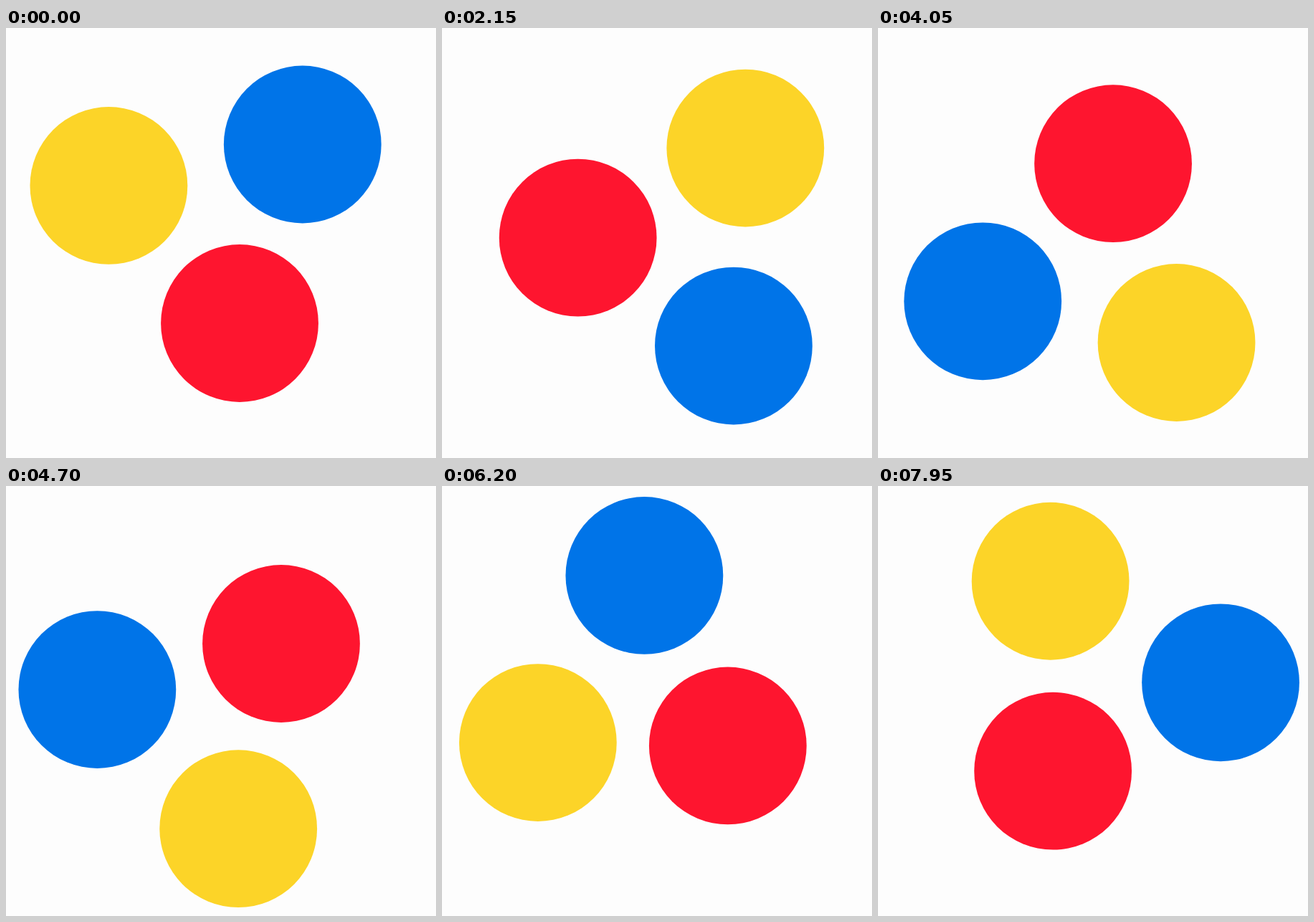
Write an HTML page that moves like this. It is 600 by 600 pixels and loops after 8 s.

```html
<!DOCTYPE html>
<html lang="en">
<head>
<meta charset="utf-8">
<title>Orbiting circles</title>
<style>
  html, body { margin: 0; height: 100%; overflow: hidden; background: #fdfdfd; }
  svg { display: block; width: 100%; height: 100%; }
</style>
</head>
<body>
<svg viewBox="0 0 600 600">
  <circle id="yellow" r="109.9" fill="#fcd428"/>
  <circle id="blue" r="109.9" fill="#0074e8"/>
  <circle id="red" r="109.9" fill="#fe152f"/>
</svg>
<script>
const LOOP = 8000, STEP = 50;
const CENTER = { x: 303.3, y: 300.4 };

// Orbit radius and starting angle in degrees, clockwise from the right.
const discs = [
  { id: 'yellow', orbit: 179, start: 206.7 },
  { id: 'blue', orbit: 176.7, start: -51.3 },
  { id: 'red', orbit: 113.9, start: 78.5 },
].map(disc => ({ ...disc, node: document.getElementById(disc.id) }));

// Shared turn: [ms, degrees]; the speed drifts slightly along the way.
const turns = [
  [0, 0], [850, 39.4], [1150, 54.9], [2150, 105.4], [3400, 171.5],
  [4700, 236.6], [6200, 314.5], [7950, 402.8], [8000, 405.3],
];

function turnAt(time) {
  const next = turns.findIndex(([ms]) => ms > time);
  const [t0, a0] = turns[next - 1];
  const [t1, a1] = turns[next];
  return a0 + (a1 - a0) * (time - t0) / (t1 - t0);
}

function draw(time) {
  const turn = turnAt(time);
  for (const { node, orbit, start } of discs) {
    const angle = (start + turn) * Math.PI / 180;
    node.setAttribute('cx', CENTER.x + orbit * Math.cos(angle));
    node.setAttribute('cy', CENTER.y + orbit * Math.sin(angle));
  }
}

const begin = performance.now();
function tick() {
  const elapsed = (performance.now() - begin) % LOOP;
  draw(Math.floor(elapsed / STEP) * STEP);
  requestAnimationFrame(tick);
}
tick();
</script>
</body>
</html>
```
